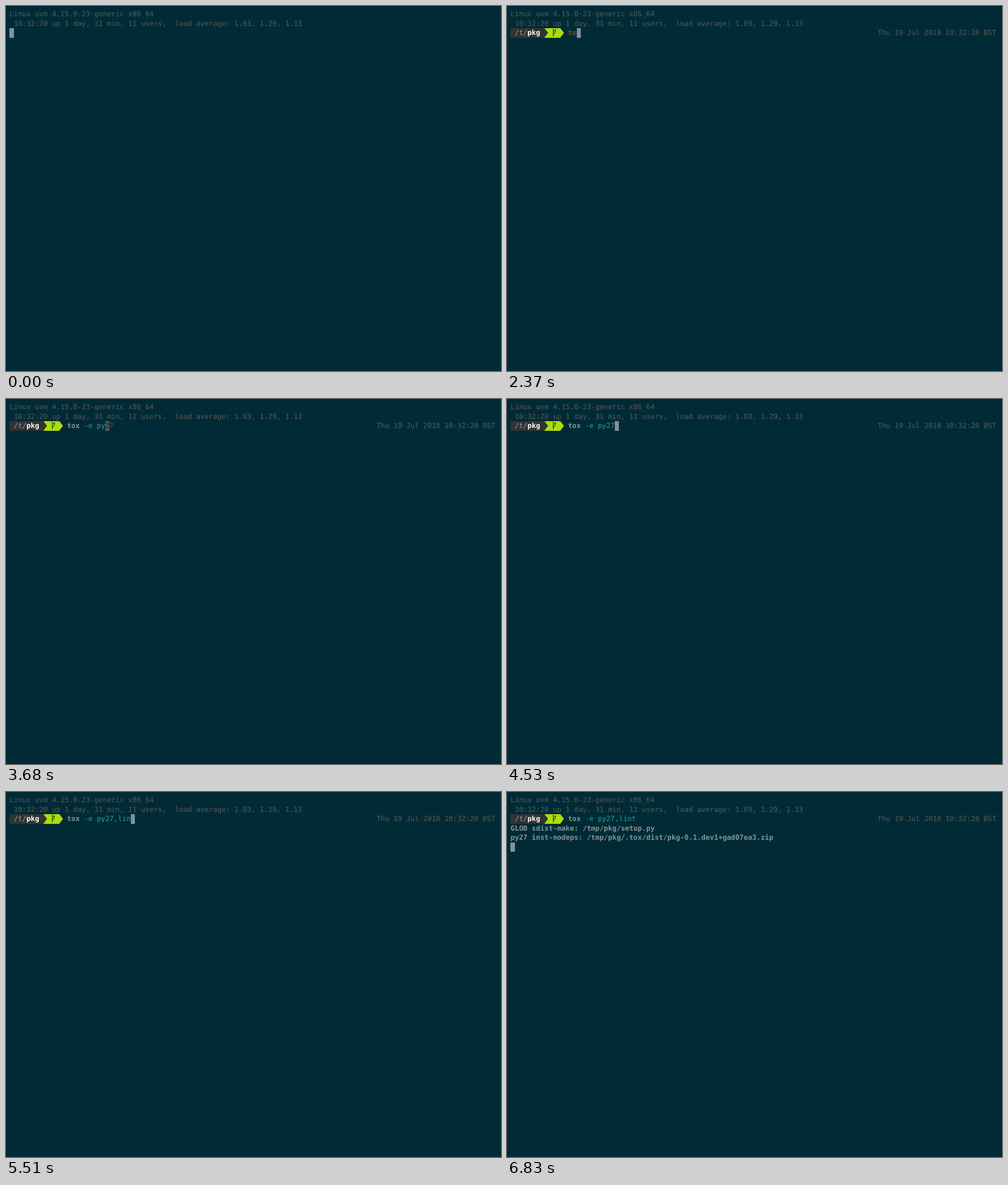
An HTML page that plays this animation: 872 px wide and 642 px high, repeating every 8000 ms.

```html
<!DOCTYPE html>
<html lang="en">
<head>
<meta charset="utf-8">
<title>Terminal session</title>
<style>
  html, body { margin: 0; width: 100%; height: 100%; overflow: hidden; background: #002b36; }
  #term {
    position: absolute; left: 6.21px; top: 6.21px;
    font: 12.417px/16.556px "DejaVu Sans Mono", monospace;
    text-rendering: geometricPrecision; font-variant-ligatures: none;
    color: #839496;
  }
  .row { height: 16.556px; white-space: pre; }
  .row span, .row svg { display: inline-block; height: 16.556px; vertical-align: top; }
  .row svg { width: 6.39px; }
  .dim { color: #585858; }
  .bold { font-weight: bold; }
  .bad { color: #cb4b16; }
  .arg { color: #2aa198; }
  .dir { background: #333; color: #999; }
  .leaf { background: #333; color: #fff; font-weight: bold; }
  .git { background: #addc10; }
  .cur { background: #839496; color: #002b36; }
  .cur.over { background: #585858; }
</style>
</head>
<body>
<div id="term"></div>
<script>
const LOOP = 8000;
const term = document.getElementById('term');

// [time, typed text, suggested rest]
const typing = [
  [120, '', ''],
  [1320, 't', 'mux'],
  [1450, 'to', ''],
  [1710, 'toz', ''],
  [2370, 'to', ''],
  [2700, 'tox', ' -e'],
  [2760, 'tox ', '-e'],
  [2960, 'tox -', 'e'],
  [3055, 'tox -e', ''],
  [3150, 'tox -e ', 'lint'],
  [3480, 'tox -e p', ''],
  [3680, 'tox -e py', '27'],
  [4340, 'tox -e py2', '7'],
  [4530, 'tox -e py27', ''],
  [4790, 'tox -e py27,', 'py36,coverage'],
  [5120, 'tox -e py27,l', ''],
  [5250, 'tox -e py27,li', ''],
  [5450, 'tox -e py27,lin', ''],
  [5545, 'tox -e py27,lint', '']
];
const ENTER = 5640;
const output = [
  [6030, 'GLOB sdist-make: /tmp/pkg/setup.py'],
  [6830, 'py27 inst-nodeps: /tmp/pkg/.tox/dist/pkg-0.1.dev1+gad07ea3.zip']
];

const span = (cls, text) => text ? `<span class="${cls}">${text}</span>` : '';
const row = html => `<div class="row">${html}</div>`;
const glyph = (cls, body) =>
  `<svg class="${cls}" viewBox="0 0 6.39 16.556" preserveAspectRatio="none">${body}</svg>`;
const wedge = (cls, fill) => glyph(cls, `<path fill="${fill}" d="M0 0L6.39 8.278L0 16.556Z"/>`);
const cursor = (ch = ' ') => span(ch === ' ' ? 'cur' : 'cur over', ch);

const branch = glyph('git',
  '<path fill="none" stroke="#0c4801" stroke-width="1.2" ' +
  'd="M1.5 1V14.5M1.5 11.5C1.5 9 5 9.5 5 6.5V3M3.4 4.8L5 2.8L6.2 4.8"/>');

const prompt = span('dir', ' /t/') + span('leaf', 'pkg') + span('dir', ' ') +
  wedge('git', '#333') + span('git', ' ') + branch + span('git', ' ') +
  wedge('', '#addc10') + ' ';

const header = row(span('dim', 'Linux uvm 4.15.0-23-generic x86_64')) +
  row(span('dim', ' 10:32:20 up 1 day, 31 min, 11 users,  load average: 1.03, 1.29, 1.13'));

const clock = span('dim', 'Thu 19 Jul 2018 10:32:20 BST');
const CLOCK_COL = 73; // columns after the prompt

function commandRow(typed, hint, active) {
  const cmd = typed.split(' ')[0];
  const valid = cmd === 't' || cmd === 'tox';
  let html = prompt + span(valid ? 'bold' : 'bad', cmd) + span('arg', typed.slice(cmd.length));
  let used = typed.length;
  if (active) {
    html += cursor(hint[0]) + span('dim', hint.slice(1));
    used += Math.max(1, hint.length);
  }
  return row(html + ' '.repeat(CLOCK_COL - used) + clock);
}

function screen(t) {
  if (t < typing[0][0]) return header + row(cursor());
  const [, typed, hint] = typing.filter(s => s[0] <= t).pop();
  const done = t >= ENTER;
  let html = header + commandRow(typed, hint, !done);
  if (done) {
    for (const [at, text] of output) if (t >= at) html += row(span('bold', text));
    html += row(cursor());
  }
  return html;
}

let shown = '';
const start = performance.now();
function draw() {
  const html = screen((performance.now() - start) % LOOP);
  if (html !== shown) term.innerHTML = shown = html;
  requestAnimationFrame(draw);
}
draw();
</script>
</body>
</html>
```
